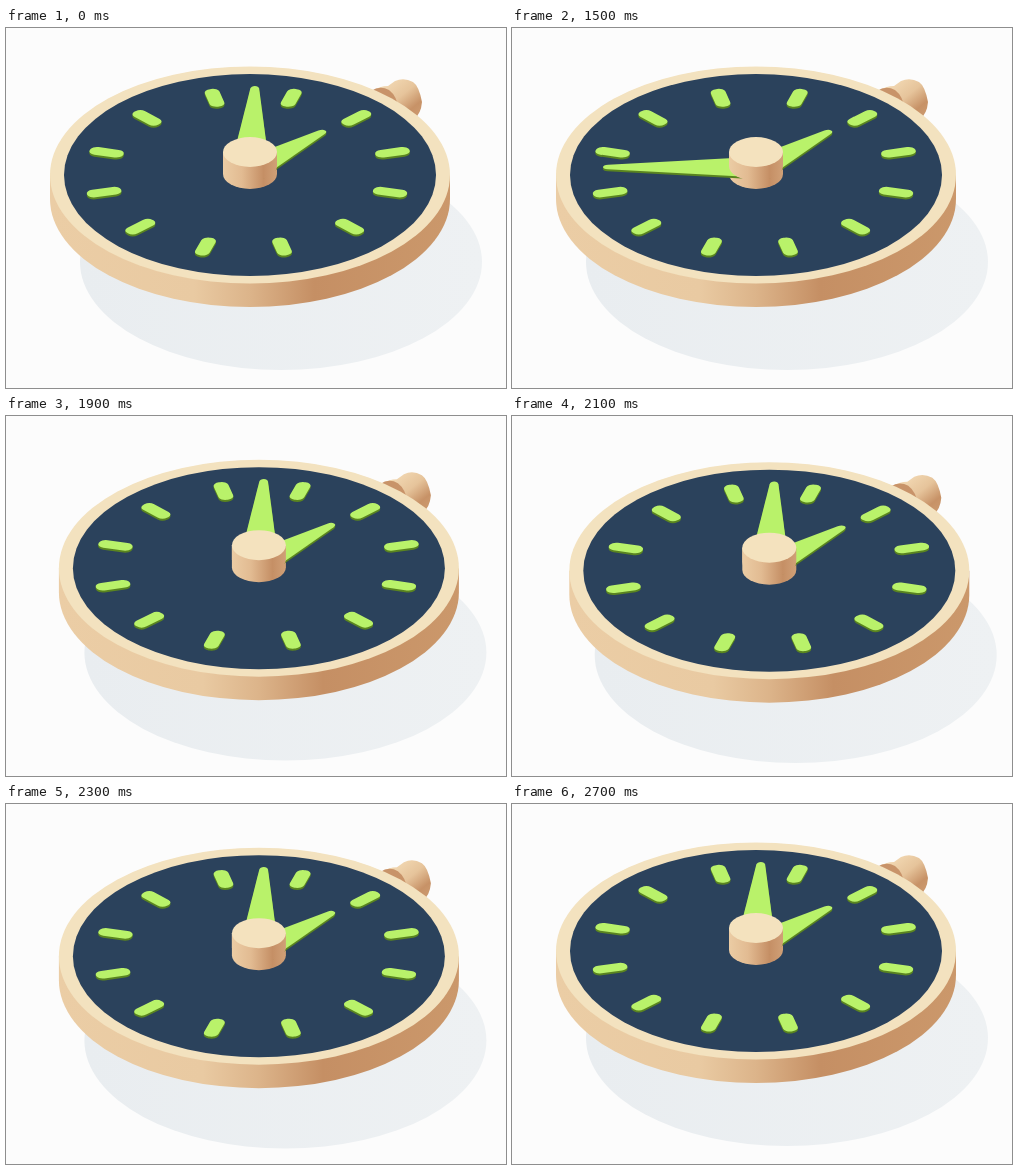
Recreate the animation shown at these times as an HTML page. Size 500 by 360 pixels, loop 5 s.

```html
<!DOCTYPE html>
<html lang="en">
<head>
<meta charset="utf-8">
<title>Alarm watch</title>
<style>
  html, body { margin: 0; width: 100%; height: 100%; overflow: hidden; background: #fcfcfc; }
  svg { display: block; width: 500px; height: 360px; }
  .lit { fill: #b9f26a; }
  .edge { fill: #5a8420; }
</style>
</head>
<body>
<svg viewBox="0 0 500 360">
  <defs>
    <linearGradient id="side">
      <stop offset="0" stop-color="#ebcda5"/>
      <stop offset=".36" stop-color="#e9caa2"/>
      <stop offset=".5" stop-color="#dcb48a"/>
      <stop offset=".66" stop-color="#c58f64"/>
      <stop offset="1" stop-color="#cb986b"/>
    </linearGradient>
    <linearGradient id="hub" gradientUnits="userSpaceOnUse" x1="217" y1="0" x2="271" y2="0">
      <stop offset="0" stop-color="#ebcca4"/>
      <stop offset=".35" stop-color="#e2bb92"/>
      <stop offset=".75" stop-color="#c58f65"/>
      <stop offset="1" stop-color="#d0a077"/>
    </linearGradient>
    <linearGradient id="knob" gradientUnits="userSpaceOnUse" x1="386" y1="54" x2="412" y2="86">
      <stop offset="0" stop-color="#f0d5af"/>
      <stop offset=".4" stop-color="#e6c49b"/>
      <stop offset=".8" stop-color="#c79267"/>
      <stop offset="1" stop-color="#cb986d"/>
    </linearGradient>
    <linearGradient id="shade">
      <stop offset="0" stop-color="#e9edf0"/>
      <stop offset="1" stop-color="#eef1f3"/>
    </linearGradient>
    <rect id="mark" x="-7.5" y="-165.5" width="15" height="35" rx="7"/>
    <path id="long" d="M-19.5 0L-4.4-148Q-3.6-153 0-153T4.4-148L19.5 0Z"/>
    <path id="short" d="M-20 0L-4.6-98Q-3.8-103 0-103T4.6-98L20 0Z"/>
  </defs>

  <ellipse id="shadow" cx="275" cy="234" rx="201" ry="108" fill="url(#shade)"/>

  <g id="watch">
    <path d="M366 63Q374 58 382 58L389 53Q398 49 407 54Q413 58 416 74Q415 86 408 91L390 92Z" fill="url(#knob)"/>
    <path d="M365 63Q374 57 383 62Q391 68 393 82L380 84Z" fill="#c89369"/>

    <path d="M44 147V171A200 108 0 0 0 444 171V147Z" fill="url(#side)"/>
    <ellipse cx="244" cy="147" rx="200" ry="108.5" fill="#f3e2bf"/>
    <ellipse cx="244" cy="147" rx="186" ry="101" fill="#2b425c"/>

    <g id="marks"></g>

    <path d="M217 124V146A27 15 0 0 0 271 146V124Z" fill="url(#hub)"/>
    <g id="hour"></g>
    <g id="minute"></g>
    <path d="M217 124V138A27 15 0 0 0 271 138V124Z" fill="url(#hub)"/>
    <ellipse cx="244" cy="124" rx="27" ry="15" fill="#f4e2be"/>
  </g>
</svg>
<script>
const LOOP = 5000, STEP = 50;
const SPIN_START = 1050, SPIN_TIME = 600;
const SHAKE_START = 1600;
const SLOPE = 0.577;

// x offsets reached every 100 ms during the shake
const BODY = [0, 4.4, -4.4, 8.9, -8.9, 13.3, -13.3, 8.9, -8.9, 4.4, -4.4, 0];
const SHADE = [0, 2.2, -2.2, 4.4, -4.4, 8.7, -8.7, 4.4, -4.4, 2.2, -2.2, 0];

const el = id => document.getElementById(id);

// Places a flat shape on the tilted dial plane
const tilt = (x, y, squash, deg) =>
  `matrix(1 0 -.032 ${squash} ${x} ${y}) rotate(${deg})`;

function raised(parent, shape, x, y, squash, deg) {
  return [2, 1, 0].map(drop => {
    const use = document.createElementNS('http://www.w3.org/2000/svg', 'use');
    use.setAttribute('href', '#' + shape);
    use.setAttribute('class', drop ? 'edge' : 'lit');
    parent.append(use);
    const turn = a => use.setAttribute('transform', tilt(x, y + drop, squash, a));
    turn(deg);
    return turn;
  });
}

for (let i = 0; i < 12; i++) raised(el('marks'), 'mark', 242.3, 144.2, 0.52, 15 + 30 * i);
raised(el('hour'), 'short', 244, 141, 0.53, 45);
const minute = raised(el('minute'), 'long', 244, 139, 0.53, 0);

function at(list, t) {
  const p = (t - SHAKE_START) / 100;
  if (p <= 0 || p >= list.length - 1) return 0;
  const i = Math.floor(p);
  return list[i] + (list[i + 1] - list[i]) * (p - i);
}

function shift(node, x) {
  node.setAttribute('transform', `translate(${x} ${x * SLOPE})`);
}

function draw(now) {
  const t = Math.floor((now % LOOP) / STEP) * STEP;
  const spin = Math.min(1, Math.max(0, (t - SPIN_START) / SPIN_TIME));
  minute.forEach(turn => turn(360 * spin));
  shift(el('watch'), at(BODY, t));
  shift(el('shadow'), at(SHADE, t));
}

const start = performance.now();
function tick() {
  draw(performance.now() - start);
  requestAnimationFrame(tick);
}
tick();
</script>
</body>
</html>
```
